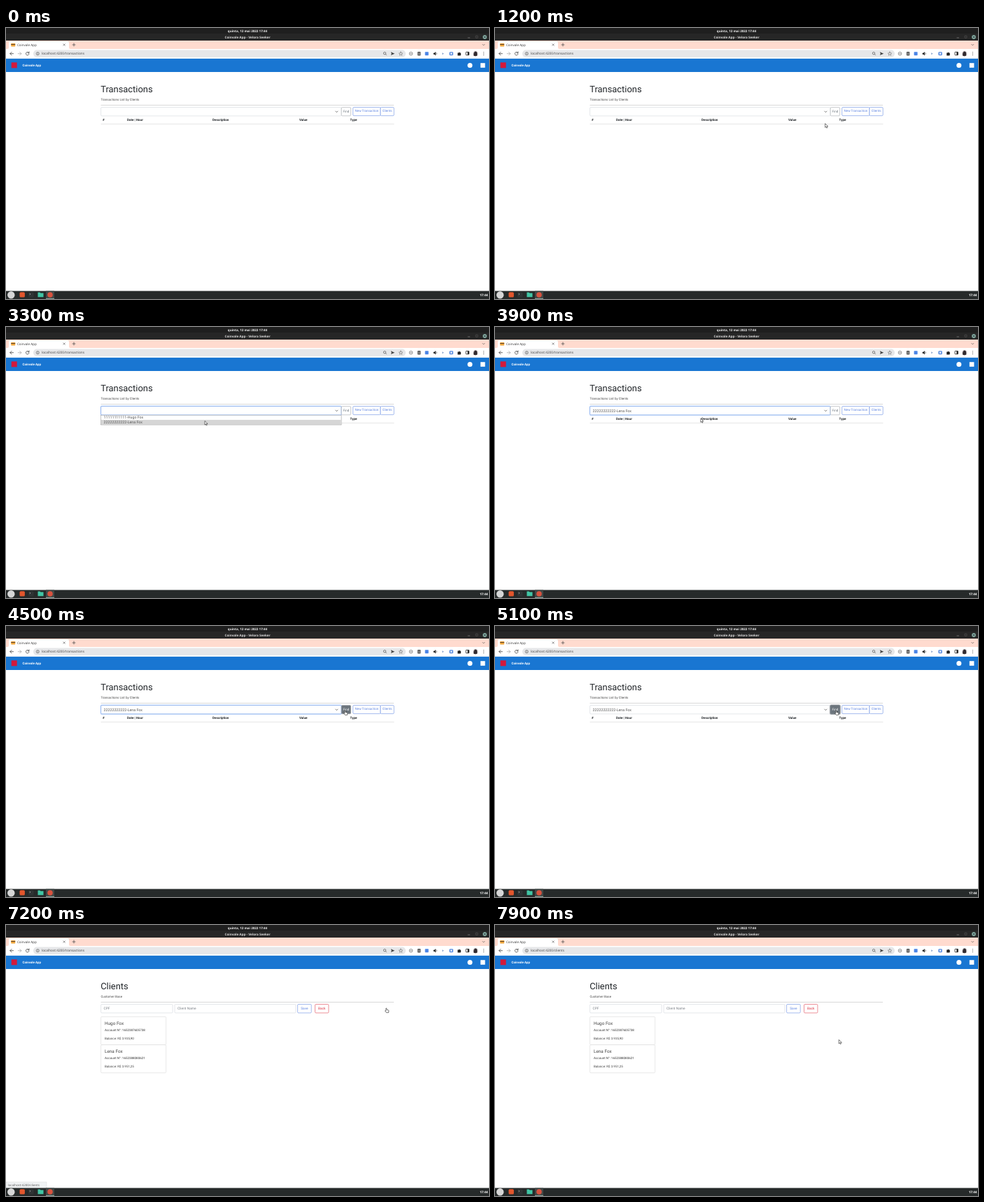
Write an HTML page that moves like this. It is 690 px wide and 388 px high and loops after 8000 ms.

```html
<!DOCTYPE html>
<html lang="en">
<head>
<meta charset="utf-8">
<title>Transactions</title>
<style>
  html, body { margin: 0; width: 100%; height: 100%; overflow: hidden; background: #fff; }
  svg { display: block; width: 690px; height: 388px; }
  text { font-family: Roboto, sans-serif; text-rendering: geometricPrecision; white-space: pre; }
  .ui { font-family: "Open Sans", sans-serif; }
</style>
</head>
<body>
<svg id="stage" viewBox="0 0 690 388" xmlns="http://www.w3.org/2000/svg"></svg>
<script>
const LOOP = 8000, STEP = 100;
const APP = 'Coinvale App', BROWSER = 'Velora Seeker';
const ANN = 'Lena Fox', BOB = 'Hugo Fox';
const BLUE = '#5b82e0', GREY = '#6c757d', INK = '#212529';

const text = (x, y, s, size = 4.55, fill = INK, extra = '') =>
  `<text x="${x}" y="${y}" font-size="${size}" fill="${fill}" ${extra}>${s}</text>`;
const rect = (x, y, w, h, fill, extra = '') =>
  `<rect x="${x}" y="${y}" width="${w}" height="${h}" fill="${fill}" ${extra}/>`;
const box = (x, y, w, h, stroke, r = 1.4, fill = '#fff', sw = .55) =>
  rect(x, y, w, h, fill, `rx="${r}" stroke="${stroke}" stroke-width="${sw}"`);
const dot = (x, y, r, fill, extra = '') => `<circle cx="${x}" cy="${y}" r="${r}" fill="${fill}" ${extra}/>`;
const line = (d, color = '#444', w = .8) =>
  `<path d="${d}" fill="none" stroke="${color}" stroke-width="${w}" stroke-linecap="round" stroke-linejoin="round"/>`;
const shape = (d, fill, extra = '') => `<path d="${d}" fill="${fill}" ${extra}/>`;
const group = (id, body) => `<g id="${id}">${body}</g>`;
const BOLD = 'font-weight="700"', MID = 'text-anchor="middle"';

function desktop() {
  return rect(0, 0, 690, 18, '#262626') + rect(0, 0, 690, 8, '#1f1f1f') +
    text(345, 5.6, 'quinta, 12 mai 2022 17:44', 4.5, '#f4f4f4', `class="ui" ${BOLD} ${MID}`) +
    text(345, 14.6, `${APP} - ${BROWSER}`, 4.6, '#dcdcdc', `class="ui" ${BOLD} ${MID}`) +
    line('M660 14H662.5', '#999', .6) + box(671, 11.2, 3, 3, '#666', .3, 'none', .5) +
    dot(684, 13, 2.9, '#7fa69b') + line('M683 12L685 14M685 12L683 14', '#223', .6) +
    rect(0, 376.5, 690, 11.5, '#262a2a') +
    dot(7.3, 382.2, 5.2, '#d6d6d6') +
    rect(19.5, 378.2, 7.4, 7.4, '#e2562d', 'rx="1.6"') +
    rect(32.2, 378.4, 7.4, 7, '#2f3435', 'rx="1"') + line('M34 380.2L35 381L34 381.8', '#ddd', .5) +
    shape('M45.5 378.6H48.5L49.5 379.6H53.5V385.3H45.5Z', '#41c5a4') +
    rect(57, 376.5, 12, 11.5, '#414847') + rect(57, 387, 12, 1, '#8fa39d') + dot(63, 382, 3.8, '#d9533f') +
    text(688.5, 384, '17:44', 4.6, '#fff', `class="ui" ${BOLD} text-anchor="end"`);
}

function browser() {
  return rect(0, 18, 690, 12, '#ffdbcf') +
    shape('M2 30Q4 30 4 28V21Q4 19.2 6 19.2H88Q90 19.2 90 21V28Q90 30 92 30Z', '#fff') +
    rect(7.2, 22, 6, 4.4, '#f0a63a', 'rx=".6"') + rect(7.2, 23, 6, 1, '#5a4634') +
    text(16, 25.7, APP, 4.55, '#333', 'class="ui"') +
    line('M82 22.8L84.4 25.2M84.4 22.8L82 25.2', '#444', .6) +
    line('M95 24H99M97 22V26', '#444', .7) + line('M680.8 23.4L682.3 24.9L683.8 23.4', '#444', .6) +
    rect(0, 30, 690, 13.6, '#fff') +
    line('M10.5 36.7H5.8M8 34.5L5.8 36.7L8 38.9') +
    line('M17.2 36.7H21.9M19.7 34.5L21.9 36.7L19.7 38.9', '#aaa') +
    line('M32.6 35.4A2.3 2.3 0 1 0 33 37.2M33 34V35.8H31.2') +
    rect(39, 31.6, 532, 10.3, '#e6e7e9', 'rx="5.1"') +
    dot(45.3, 36.7, 2.1, 'none', 'stroke="#555" stroke-width=".6"') + line('M45.3 36.6V37.8M45.3 35.5V35.6', '#555', .6) +
    group('url', '') +
    dot(541, 36.2, 1.7, 'none', 'stroke="#555" stroke-width=".7"') + line('M542.3 37.5L543.5 38.8', '#555', .7) +
    shape('M549.8 34.3L555.2 36.7L549.8 39.1L550.8 36.7Z', '#444') +
    line('M564 34.1L564.8 35.9L566.7 36.1L565.3 37.3L565.7 39.2L564 38.2L562.3 39.2L562.7 37.3L561.3 36.1L563.2 35.9Z', '#555', .5) +
    box(576.2, 34.4, 4.6, 4.6, '#777', 2, '#eee', .7) + line('M577.2 36.7H579.8', '#777', .6) +
    rect(587.8, 34, 4.6, 5.4, '#555', 'rx="1"') + line('M588.8 36H591.4M588.8 37.6H591.4', '#ddd', .5) +
    rect(598.6, 34.2, 5, 5, '#4a84e6', 'rx=".6"') +
    shape('M610.6 35.7H612L613.8 34V39.4L612 37.7H610.6Z', '#222') + line('M614.9 35.5Q616 36.7 614.9 37.9', '#222', .6) +
    shape('M623.2 35.2L625.7 36.7L623.2 38.2Z', '#8ca5ce') +
    rect(633.4, 34.2, 5.4, 5, '#5b8ddf', 'rx="1.3"') + rect(635, 35.5, 2.2, 2.4, '#e7effb') +
    shape('M645.2 35.4H646.7A1 1 0 0 1 648.5 35.4H649.6V36.6A1 1 0 0 1 649.6 38.2V39.4H645.2Z', '#222') +
    box(657, 34.4, 4.4, 4.4, '#222', .4, '#fff', .8) + rect(659.4, 34.4, 2, 4.4, '#222') +
    dot(670.7, 36.7, 3.7, '#d8d2d4') + shape('M668 39.4Q668 33.6 671 33.6Q673.6 33.8 673.2 39.4Q670.7 41 668 39.4Z', '#322b30') +
    [34.7, 36.7, 38.7].map(y => dot(682.4, y, .55, '#444')).join('');
}

function navbar() {
  return rect(0, 43.6, 690, 19.4, '#1976d2') +
    rect(7.7, 49.3, 8, 8, '#d3193b') +
    text(23.5, 55, APP, 4.5, '#fff', BOLD) +
    dot(662.8, 53.4, 3.5, '#fff') + rect(677.8, 50.2, 6.6, 6.6, '#fff');
}

function heading(title, sub) {
  return text(135.2, 92.4, title, 12.9) + text(135.4, 103.7, sub, 4.5, '#444') +
    rect(135.5, 110.3, 418.5, .7, '#c9c9c9');
}

function tableHead(xs) {
  const names = ['#', 'Date | Hour', 'Description', 'Value', 'Type'];
  return names.map((s, i) => text(xs[i], 133.4, s, 4.55, INK, BOLD)).join('');
}

function rows() {
  const data = [
    ['17:41:41', 'Salary', 'R$ 4.000,00', 'INCOME'],
    ['17:41:56', 'Milk', '-R$ 3,75', 'EXPENSES'],
    ['17:42:09', 'Pizza', '-R$ 45,00', 'EXPENSES']
  ];
  return data.map(([hour, what, value, type], i) => {
    const y = 138.4 + i * 12.3, b = y + 7.4;
    return rect(135.5, y, 419, 12.3, i % 2 ? '#fff' : '#f2f2f2') +
      rect(135.5, y + 12, 419, .4, '#dee2e6') +
      text(138, b, i + 1, 4.55, INK, BOLD) + text(162, b, '12/05/2022 ' + hour, 4.5, '#444') +
      text(305, b, what, 4.5, '#444') + text(389, b, value, 4.5, i ? '#f33' : '#22f') +
      text(476, b, type, 4.5, '#444');
  }).join('');
}

function transactions() {
  return heading('Transactions', 'Transactions List by Clients') +
    group('ring', rect(134.6, 112.5, 345.4, 14.4, '#cfe1fd', 'rx="2"')) +
    box(135.6, 113.5, 343.4, 12.4, '#ced4da') +
    group('ringLine', box(135.6, 113.5, 343.4, 12.4, '#82adf5', 1.4, 'none', .7)) +
    group('picked', text(139.5, 121.6, '22222222222-' + ANN, 5.3, '#555')) +
    line('M470.8 119.1L472.4 120.7L474 119.1', '#444', .7) +
    group('find', '') +
    box(495.7, 113.5, 39.3, 12.1, BLUE) + text(515.4, 120, 'New Transaction', 4.5, BLUE, MID) +
    group('link', '') +
    group('empty', tableHead([138, 173, 295, 419, 491.5]) + rect(135.5, 137.5, 419, .5, '#ccc')) +
    group('full', tableHead([138, 162, 305, 389, 476]) + rows() + rect(135.5, 137.7, 419, .8, '#444')) +
    group('list', '');
}

function card(y, name, account, balance) {
  return box(135.6, y, 93, 40.2, '#d5d5d5') + text(141, y + 11.8, name, 6.4, '#444') +
    text(141, y + 20.6, 'Account N°: ' + account, 4.5, '#333') +
    text(141, y + 32.6, 'Balance: R$ ' + balance, 4.5, '#444');
}

function clients() {
  return heading('Clients', 'Customer Base') +
    box(135.6, 113.5, 102.4, 12.4, '#ced4da') + text(139.5, 121.4, 'CPF', 4.9, '#7b8187') +
    box(241, 113.5, 173, 12.4, '#ced4da') + text(245, 121.4, 'Client Name', 4.9, '#7b8187') +
    box(416.6, 113.5, 19.6, 12.4, BLUE) + text(426.4, 121.3, 'Save', 4.8, BLUE, MID) +
    box(441.5, 113.5, 19.4, 12.4, '#dc3545') + text(451.2, 121.3, 'Back', 4.8, '#dc3545', MID) +
    card(131.3, BOB, '1652387605738', '3.935,90') + card(171.5, ANN, '1652388080621', '3.951,25');
}

function menu(over) {
  return rect(135.2, 127, 344.4, 14, '#e2e2e2', 'rx="1"') +
    box(135.6, 126.2, 343.4, 13.6, '#9a9a9a', 0, '#fff', .5) +
    (over ? rect(136, 132.9, 342.6, 6.6, '#d6d6d6') : '') +
    text(139.5, 131.2, '11111111111-' + BOB, 5.3, '#555') +
    text(139.5, 138, '22222222222-' + ANN, 5.3, '#555');
}

function findButton(hover, focus) {
  return (focus ? box(478.8, 113.4, 14.2, 12.6, hover ? '#a9aeb3' : '#858b91', 1.6, 'none', 1.8) : '') +
    box(479.2, 113.6, 13.4, 12.2, focus ? GREY : '#9aa0a6', 1.4, hover ? GREY : '#fff') +
    text(485.9, 121.3, 'Find', 4.6, hover ? '#fff' : GREY, MID);
}

const clientsLink = hover =>
  box(535, 113.5, 19.2, 12.1, BLUE, 1.4, hover ? '#0d6efd' : '#fff') +
  text(544.6, 120, 'Clients', 4.5, hover ? '#fff' : BLUE, MID);

const arrow = shape('M0 0V5.6L1.3 4.4L2.2 6.4L3.2 5.9L2.3 4H4.1Z', '#fff', 'stroke="#222" stroke-width=".6"');
const hand = shape('M0 0Q.9 -.2 1 .8V2.4L3.4 3Q4 3.2 3.9 4L3.5 6.4H.3L-1.5 3.8Q-1.2 3 -.2 3.8V.6Q-.3 0 0 0Z',
  '#fff', 'stroke="#222" stroke-width=".6"');

const stage = document.getElementById('stage');
stage.innerHTML = rect(0, 0, 690, 388, '#fff') + navbar() + browser() +
  group('listing', transactions()) + group('clients', clients()) +
  group('status', rect(0, 368, 58, 8.5, '#f1f3f4', 'stroke="#ccc" stroke-width=".4"') +
    text(2.5, 373.8, 'localhost:4200/clients', 4.5, '#555', 'class="ui"')) +
  desktop() + group('pointer', '');

const $ = id => document.getElementById(id);
const show = (id, on) => $(id).setAttribute('display', on ? 'inline' : 'none');
const put = (id, html) => { if ($(id).innerHTML !== html) $(id).innerHTML = html; };

// pointer stops: time, x, y
const path = [
  [0, 463, 396], [200, 462, 380], [500, 461, 277], [800, 468, 172], [900, 465, 149], [1200, 471.6, 136.8],
  [1400, 474, 127], [1600, 474, 127], [1800, 473.6, 126.4], [2000, 473.6, 126.4], [2200, 472.8, 120.8],
  [2700, 472.8, 120.8], [3300, 284, 134.5], [3800, 284, 134.5], [3900, 293.8, 130.8],
  [4500, 484, 121], [4600, 487, 121], [5500, 487, 121], [6000, 515, 133], [6300, 527.8, 136.8],
  [6600, 543, 119], [7350, 543, 119], [7800, 491.2, 164.2], [8000, 491.2, 164.2]
];
function pointerAt(t) {
  const i = path.findIndex(p => p[0] > t);
  const [t0, x0, y0] = path[i - 1], [t1, x1, y1] = path[i];
  const u = (t - t0) / (t1 - t0), k = u * u * (3 - 2 * u);
  return [x0 + (x1 - x0) * k, y0 + (y1 - y0) * k];
}

function draw(time) {
  const t = Math.floor((time % LOOP) / STEP) * STEP;
  const within = (a, b) => t >= a && t < b;
  const onClients = t >= 7200, focused = within(2700, 4900), found = t >= 5300;
  const overFind = within(4500, 5700), overLink = within(6500, 7400);
  show('listing', !onClients);
  show('clients', onClients);
  show('ring', focused);
  show('ringLine', focused);
  show('picked', t >= 3400);
  show('empty', !found);
  show('full', found);
  show('status', within(6600, 7500));
  put('list', within(2700, 3400) ? menu(t >= 3100) : '');
  put('find', findButton(overFind, t >= 4900));
  put('link', clientsLink(overLink));
  put('url', text(51, 38.3, 'localhost:4200/' + (t >= 7400 ? 'clients' : 'transactions'), 4.75, '#444', 'class="ui"'));
  const [x, y] = pointerAt(t);
  put('pointer', overFind || overLink ? hand : arrow);
  $('pointer').setAttribute('transform', `translate(${x.toFixed(2)} ${y.toFixed(2)})`);
}

const start = performance.now();
function tick(now) {
  draw(Math.max(0, now - start));
  requestAnimationFrame(tick);
}
draw(0);
requestAnimationFrame(tick);
</script>
</body>
</html>
```
